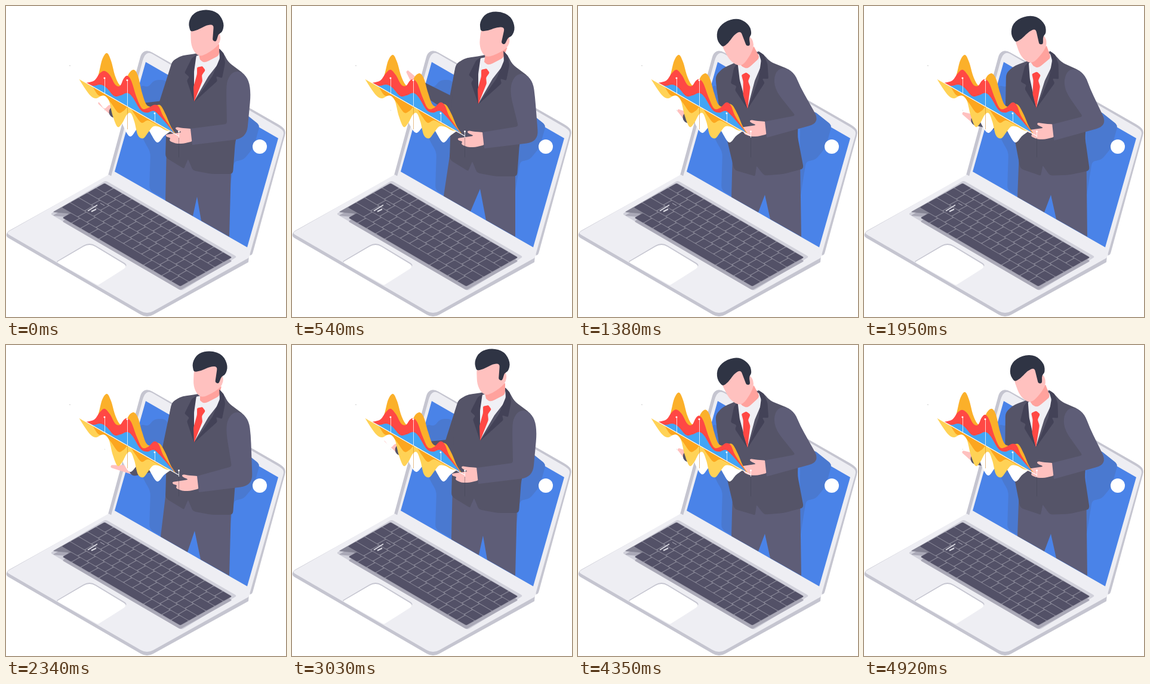
These frames come from a looping animation (469x522 px, 4950 ms). An HTML page with a canvas:

```html
<!DOCTYPE html>
<html lang="en">
<head>
<meta charset="utf-8">
<title>Presenter on a laptop</title>
<style>
html, body { margin: 0; width: 100%; height: 100%; overflow: hidden; background: #fff; }
canvas { display: block; width: 469px; height: 522px; }
</style>
</head>
<body>
<canvas id="stage"></canvas>
<script>
const LOOP = 4950, CYCLE = 3000, STEP = 30;
const canvas = document.getElementById('stage');
const ctx = canvas.getContext('2d');
const dpr = window.devicePixelRatio || 1;
canvas.width = 469 * dpr;
canvas.height = 522 * dpr;

const C = {
  light: '#eeeef3', edge: '#c5c5d0', blue: '#4a83e8', shade: '#4a79d0',
  key: '#535167', gap: '#858494', jacket: '#555468', sleeve: '#5e5d77',
  lapel: '#434257', hair: '#2f3444', skin: '#ffc1bf', neck: '#ffa29d',
  red: '#ff4844', amber: '#fbb02a', orange: '#fca61f', yellow: '#ffd256', sky: '#42a5f5'
};

// Polygon with corners softened by up to r; a point may carry its own radius.
function shape(pts, fill, r = 0) {
  const n = pts.length;
  const toward = (p, q, d) => {
    const len = Math.hypot(q[0] - p[0], q[1] - p[1]) || 1;
    const f = Math.min(d / len, 0.5);
    return [p[0] + (q[0] - p[0]) * f, p[1] + (q[1] - p[1]) * f];
  };
  ctx.beginPath();
  pts.forEach((p, i) => {
    const d = p[2] ?? r;
    const a = toward(p, pts[(i + n - 1) % n], d);
    const b = toward(p, pts[(i + 1) % n], d);
    ctx.lineTo(...a);
    ctx.quadraticCurveTo(p[0], p[1], b[0], b[1]);
  });
  ctx.closePath();
  ctx.fillStyle = fill;
  ctx.fill();
}

// Smooth curve through points, closed by a straight line.
function wave(pts, fill) {
  const at = i => pts[Math.max(0, Math.min(pts.length - 1, i))];
  ctx.beginPath();
  ctx.moveTo(...at(0));
  for (let i = 0; i < pts.length - 1; i++) {
    const [a, b, c, d] = [at(i - 1), at(i), at(i + 1), at(i + 2)];
    ctx.bezierCurveTo(b[0] + (c[0] - a[0]) / 6, b[1] + (c[1] - a[1]) / 6,
      c[0] - (d[0] - b[0]) / 6, c[1] - (d[1] - b[1]) / 6, c[0], c[1]);
  }
  ctx.closePath();
  ctx.fillStyle = fill;
  ctx.fill();
}

function line(a, b, color, width = 1) {
  ctx.beginPath();
  ctx.moveTo(...a);
  ctx.lineTo(...b);
  ctx.strokeStyle = color;
  ctx.lineWidth = width;
  ctx.stroke();
}

function dot(x, y, r, fill) {
  ctx.beginPath();
  ctx.arc(x, y, r, 0, Math.PI * 2);
  ctx.fillStyle = fill;
  ctx.fill();
}

// Tapered limb with round ends.
function limb(a, b, wa, wb, fill) {
  const ang = Math.atan2(b[1] - a[1], b[0] - a[0]);
  ctx.beginPath();
  ctx.arc(a[0], a[1], wa / 2, ang + Math.PI / 2, ang - Math.PI / 2);
  ctx.arc(b[0], b[1], wb / 2, ang - Math.PI / 2, ang + Math.PI / 2);
  ctx.closePath();
  ctx.fillStyle = fill;
  ctx.fill();
}

// Rotates about pivot, then moves the pivot to a new place.
function mover(pivot, to, deg) {
  const c = Math.cos(deg * Math.PI / 180), s = Math.sin(deg * Math.PI / 180);
  return p => {
    const x = p[0] - pivot[0], y = p[1] - pivot[1];
    return [to[0] + x * c - y * s, to[1] + x * s + y * c, p[2]];
  };
}

const TIMES = [0, 540, 780, 1380, 1920, 2340];
const POSE = {
  headX: [335, 343, 282, 262, 274, 341],
  headY: [34, 37, 43, 50, 45, 38],
  headA: [0, 8, -13, -25, -18, 4],
  bodyX: [315, 312, 291, 284, 288, 315],
  bodyY: [161, 165, 171, 173, 172, 164],
  bodyA: [0, 0, -11.5, -15, -12.7, 0],
  elbowX: [403, 413, 409, 406, 408, 413],
  elbowY: [222, 228, 202, 196, 200, 236],
  bendX: [370, 379, 367, 364, 366, 378],
  bendY: [198, 202, 183, 184, 185, 204],
  cuffX: [309, 319, 315, 313, 315, 320],
  cuffY: [206, 212, 190, 194, 198, 220],
  farElbowX: [268, 275, 258, 252, 250, 272],
  farElbowY: [172, 170, 182, 182, 200, 193],
  farWristX: [182, 212, 222, 185, 188, 216],
  farWristY: [178, 134, 182, 187, 191, 210],
  farTipX: [157, 194, 202, 169, 167, 178],
  farTipY: [163, 111, 172, 176, 180, 204],
  footX: [267, 254, 257, 257, 257, 259],
  gapX: [313, 299, 303, 302, 302, 304],
  forkX: [320, 315, 313, 313, 313, 316],
  forkY: [320, 307, 316, 317, 317, 312],
  innerX: [327, 325, 323, 322, 322, 326]
};

// Cyclic monotone cubic through the pose values.
function sample(vals, t) {
  const n = vals.length;
  const span = i => (i === n - 1 ? CYCLE : TIMES[i + 1]) - TIMES[i];
  const rate = i => (vals[(i + 1) % n] - vals[i]) / span(i);
  const slope = i => {
    const a = rate((i + n - 1) % n), b = rate(i);
    return a * b > 0 ? 2 * a * b / (a + b) : 0;
  };
  let i = n - 1;
  while (TIMES[i] > t) i--;
  const j = (i + 1) % n, h = span(i), u = (t - TIMES[i]) / h, v = 1 - u;
  return vals[i] * (1 + 2 * u) * v * v + vals[j] * u * u * (3 - 2 * u) +
    h * (slope(i) * u * v * v - slope(j) * u * u * v);
}

function drawLaptop() {
  // lid
  shape([[171, 284], [227, 78, 9], [238, 74, 8], [462, 202, 9], [469, 210, 8], [412, 419, 6], [404, 418]], C.edge);
  shape([[176, 286], [231, 84, 8], [239, 77, 7], [461, 206, 7], [466, 212, 6], [408, 418]], C.light);
  // base
  shape([[172, 284], [2, 379, 5], [0, 387, 4], [236, 524, 12], [406, 430], [407, 418]], C.edge);
  shape([[172, 283], [0, 381, 6], [236, 518, 12], [406, 423], [409, 417]], C.light);
  shape([[234, 94], [456, 222], [404, 405], [182, 278]], C.blue);
  // cast shade on the screen
  shape([[268, 124], [248, 124], [238, 137], [226, 132], [216, 164], [230, 225], [242, 245], [240, 309], [300, 343], [300, 200]], C.shade, 8);
  shape([[372, 200], [395, 176], [425, 200], [415, 237], [398, 258], [382, 261], [371, 330]], C.shade, 6);
  drawKeyboard();
  shape([[84, 429, 3], [140, 396, 12], [205, 435, 8], [154, 469, 2]], C.edge);
  shape([[85, 430, 3], [140, 398, 12], [204, 437, 8], [154, 469, 2]], '#fff');
  dot(425, 236, 12, '#fff');
}

function drawKeyboard() {
  const at = (u, v) => [165 + 214 * u - 87 * v, 297 + 125 * u + 49 * v];
  shape([[167, 293], [387, 421], [294, 478], [74, 349]], '#d0d0da', 4);
  const outline = [at(0, 0), at(1, 0), at(1, 1), at(0.075, 1), at(0.075, 0.86), at(0, 1)];
  shape(outline.map(p => [p[0], p[1] + 6]), '#aaa9b7', 3);
  shape(outline, C.gap, 3);
  for (let row = 0; row < 6; row++) {
    const v0 = row / 6 + 0.006, v1 = (row + 1) / 6 - 0.006;
    let u = row === 5 ? 0.075 : 0;
    for (let col = 0; u < 0.98; col++) {
      let w = 1 / 14;
      if (col === 0 && row < 5) w *= 1 + row * 0.2;
      if (row === 5 && col === 4) w = 0.35;
      const end = u + w > 0.95 ? 1 : u + w;
      shape([at(u + 0.003, v0), at(end - 0.003, v0), at(end - 0.003, v1), at(u + 0.003, v1)], C.key, 1.5);
      u = end;
    }
  }
  line([137, 344], [153, 334], '#dddde5', 1.5);
  line([143, 345], [151, 341], '#dddde5', 2);
  line([158, 331], [165, 335], '#aaa9b7', 1);
}

function drawMan(t) {
  const p = {};
  for (const k in POSE) p[k] = sample(POSE[k], t);
  const body = mover([315, 161], [p.bodyX, p.bodyY], p.bodyA);
  const head = mover([335, 34], [p.headX, p.headY], p.headA);
  const onBody = (pts, fill, r) => shape(pts.map(body), fill, r);
  const onHead = (pts, fill, r) => shape(pts.map(head), fill, r);
  const floor = x => [x, 278 + (x - 182) * 0.5695];

  // legs stop at the lower screen edge
  const hip = body([269, 235]), side = body([377, 270]);
  shape([hip, floor(p.footX), floor(p.gapX), [p.forkX, p.forkY], floor(p.innerX), floor(374), side], C.sleeve);

  // far arm
  const elbow = [p.farElbowX, p.farElbowY], wrist = [p.farWristX, p.farWristY];
  limb(wrist, [p.farTipX, p.farTipY], 17, 5, C.skin);
  limb(elbow, wrist, 27, 19, C.jacket);
  limb(body([292, 103]), elbow, 32, 28, C.jacket);

  onBody([[318, 80, 4], [290, 84, 12], [277, 96, 12], [273, 120], [269, 185], [267, 254], [298, 273, 2],
    [305, 257, 2], [313, 276, 5], [345, 282], [380, 282], [384, 228], [398, 180],
    [404, 118, 12], [372, 94, 8], [365, 80], [357, 71]], C.jacket, 6);

  onBody([[318, 84], [357, 76], [361, 90], [339, 118], [315, 160], [313, 108]], '#f0f0f5', 2);
  shape([head([322, 77]), head([357, 64]), body([357, 83, 5]), body([332, 96, 8]), body([325, 90])], C.neck);
  onBody([[319, 82], [311, 88], [299, 112], [307, 119], [303, 125], [315, 161], [315, 110]], C.lapel, 2);
  onBody([[357, 71], [365, 80], [367, 96], [362, 121], [352, 118], [354, 126], [315, 161], [346, 117], [358, 88]], C.lapel, 2);
  onBody([[320, 103], [329, 101], [334, 108], [328, 116], [329, 126], [315, 161], [314, 136], [320, 114]], C.red, 2);

  // near arm
  const cuff = [p.cuffX, p.cuffY], low = [p.cuffX + 3, p.cuffY + 27];
  const fist = [[2, 0], [-12, -1], [-25, -3], [-25, 1], [-14, 6], [-42, 10], [-40, 14],
    [-33, 15], [-36, 20], [-25, 25], [-12, 25], [4, 21]];
  shape(fist.map(q => [cuff[0] + q[0], cuff[1] + q[1]]), C.skin, 4);
  const shoulder = [[369, 145], [370, 124], [381, 109], [396, 111], [407, 125], [410, 148]].map(body);
  shape([...shoulder, [p.elbowX, p.elbowY, 20], [...low, 1], [...cuff, 1], [p.bendX, p.bendY, 4]], C.sleeve, 14);

  // head
  onHead([[309, 38], [310, 66], [317, 80], [327, 85], [343, 76], [352, 69], [358, 62], [360, 50], [348, 28], [320, 28]], C.skin, 9);
  onHead([[309, 43, 4], [305, 28, 14], [314, 11, 14], [335, 5, 16], [356, 11, 14], [366, 30, 14], [362, 44, 5],
    [356, 47, 4], [352, 60, 4], [346, 58, 3], [348, 31, 6], [336, 32, 8], [320, 41, 8]], C.hair);
}

function drawChart(t) {
  // 1 at the loop ends, resting at 0 in between
  const ease = x => x * x * (3 - 2 * x);
  const k = t < 540 ? 1 - ease(t / 540) : t > 3300 ? ease((t - 3300) / 1620 > 1 ? 1 : (t - 3300) / 1620) : 0;
  const lift = pts => pts.map(([x, y, d = 0]) => [x, y + d * k]);
  const w = (pts, fill) => wave(lift(pts), fill);

  w([[128, 125], [146, 150], [157, 163], [165, 172], [174, 166], [186, 175], [198, 201, 4], [208, 213, 6], [218, 204, 4],
    [228, 192], [240, 210], [253, 229], [265, 218], [276, 210]], '#fff');
  w([[122, 122], [132, 138], [142, 151], [151, 155], [163, 150], [172, 158], [179, 185], [187, 203], [195, 196], [202, 183],
    [209, 180], [215, 194], [221, 217], [230, 222], [239, 211], [247, 202], [257, 203], [266, 208], [278, 211]], C.yellow);
  w([[145, 135], [155, 150], [166, 151], [176, 163], [188, 179], [197, 176], [206, 169], [217, 184], [227, 196], [237, 192],
    [247, 196], [262, 204], [282, 213]], C.orange);
  w([[134, 129], [146, 129], [154, 118], [161, 92, -2], [169, 82, -3], [176, 94, -2], [183, 118], [191, 133], [199, 132, -3],
    [206, 118, -5], [214, 113, -6], [221, 122, -5], [228, 146], [235, 165], [243, 169], [251, 164, 3], [259, 167], [268, 183], [276, 202], [284, 214]], C.amber);
  w([[134, 129], [148, 125], [157, 113], [165, 107, 2], [174, 116], [183, 132], [191, 134], [197, 126, -4], [203, 123, -6],
    [210, 130, -4], [219, 154], [228, 172], [238, 171], [248, 162, 4], [256, 167, 2], [264, 186], [282, 213]], C.red);
  w([[134, 129], [146, 134], [158, 132], [168, 137], [181, 151], [192, 150], [203, 146], [212, 153], [225, 174], [236, 179],
    [247, 176], [257, 184], [282, 213]], C.sky);

  line([122, 122], [289, 218], '#fff', 1.2);
  line([165.5, 121], [165.5, 147], 'rgba(255,255,255,.75)');
  line([203.5, 125], [203.5, 169], 'rgba(255,255,255,.75)');
  line([203.5, 169], [203.5, 207], 'rgba(205,125,20,.5)');
  line([249.5, 180], [249.5, 195], 'rgba(255,255,255,.7)');
  line([289.5, 211], [289.5, 221], 'rgba(255,255,255,.8)');
  line([289.5, 221], [289.5, 254], 'rgba(65,64,82,.45)');
  [[165, 121], [203, 124.5], [249, 180], [289.5, 210.5]].forEach(q => dot(q[0], q[1], 1.5, '#fff'));
  dot(107, 100, 0.6, '#888');
  dot(165.5, 175, 0.5, '#bbb');
}

function frame(now) {
  const t = Math.floor((now % LOOP) / STEP) * STEP;
  ctx.setTransform(dpr, 0, 0, dpr, 0, 0);
  ctx.fillStyle = '#fff';
  ctx.fillRect(0, 0, 469, 522);
  drawLaptop();
  drawMan(t % CYCLE);
  drawChart(t);
}

const start = performance.now();
function tick() {
  frame(performance.now() - start);
  requestAnimationFrame(tick);
}
tick();
</script>
</body>
</html>
```
